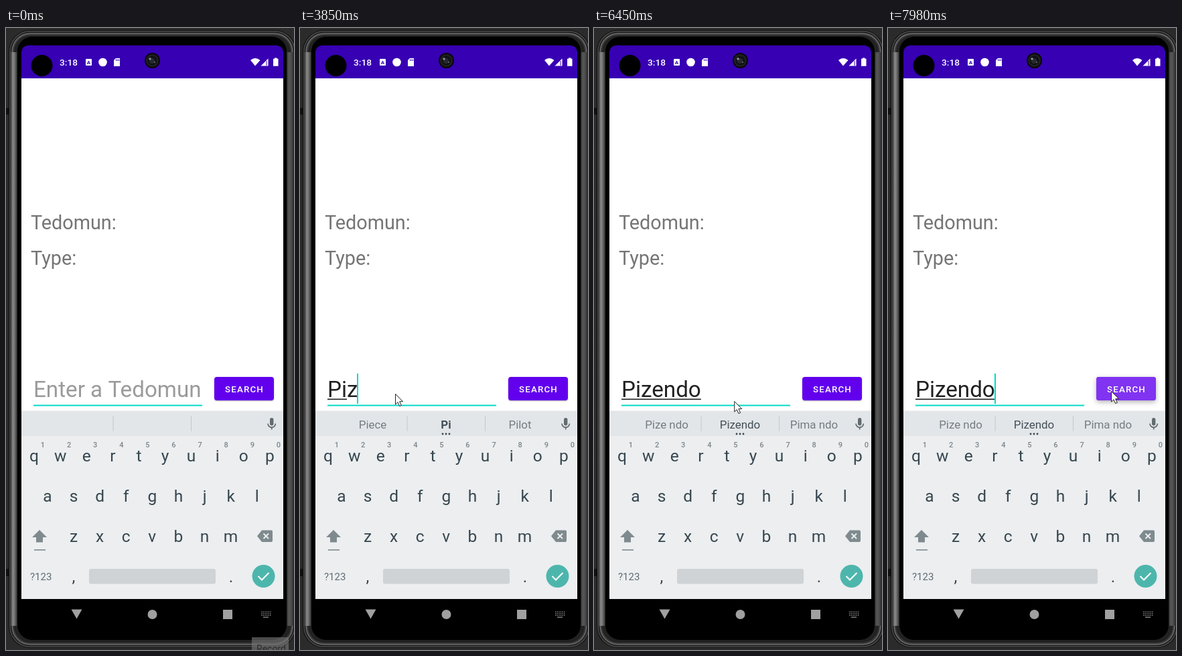
Recreate the animation shown at these times as an HTML page with a canvas. Size 430 by 927 pixels, loop 8000 ms.

```html
<!DOCTYPE html>
<html lang="en">
<head>
<meta charset="utf-8">
<title>Search screen</title>
<style>
html, body { margin: 0; width: 100%; height: 100%; overflow: hidden; background: #2b2b2b; }
canvas { display: block; width: 430px; height: 927px; }
</style>
</head>
<body>
<canvas id="stage"></canvas>
<script>
const W = 430, H = 927, LOOP = 8000;
const canvas = document.getElementById('stage');
const ctx = canvas.getContext('2d');
const dpr = window.devicePixelRatio || 1;
canvas.width = W * dpr;
canvas.height = H * dpr;

const TEAL = '#03dac5', PURPLE = '#6200ee', INK = '#37474f', KEYS = '#eceef0';
const KIND = 'Tedomun', WORD = 'Pizendo';
const FIELD_X = 41, FIELD_SIZE = 33.2;

// [time, letters typed, letters underlined]
const typing = [
  [0, 0, 0], [2080, 1, 0], [2280, 2, 0], [2400, 2, 2],
  [3850, 3, 2], [3920, 3, 3], [4450, 4, 3], [4510, 4, 4],
  [5250, 5, 4], [5350, 5, 5], [5450, 6, 6], [5550, 7, 6], [5650, 7, 7]
];
// [time, left, middle, right]
const hints = [
  [0], [2540, 'Piece', 'Pi', 'Pilot'],
  [4050, 'Pizza', 'Piz', 'Pie'],
  [4510, 'Pine', 'Pize', 'Pizza'],
  [5650, 'Pize ndo', WORD, 'Pima ndo']
];
const caretHidden = [[0, 650], [1150, 1220], [1820, 2080], [3000, 3850], [5050, 5250], [6180, 6680]];

const within = (t, a, b) => t >= a && t < b;
const latest = (list, t) => list.filter(e => e[0] <= t).pop();
const clamp = v => Math.max(0, Math.min(1, v));
const ease = p => p * p * (3 - 2 * p);
const stepped = (t, start, gap, count) => clamp((Math.floor((t - start) / gap) + 1) / count);

function rect(x, y, w, h, color) {
  ctx.fillStyle = color;
  ctx.fillRect(x, y, w, h);
}

function round(x, y, w, h, r, color) {
  ctx.beginPath();
  ctx.roundRect(x, y, w, h, r);
  ctx.fillStyle = color;
  ctx.fill();
}

function disc(x, y, r, color) {
  ctx.beginPath();
  ctx.arc(x, y, r, 0, Math.PI * 2);
  ctx.fillStyle = color;
  ctx.fill();
}

function shape(path, color, x = 0, y = 0) {
  ctx.save();
  ctx.translate(x, y);
  ctx.fillStyle = color;
  ctx.fill(new Path2D(path));
  ctx.restore();
}

function line(path, color, width) {
  ctx.strokeStyle = color;
  ctx.lineWidth = width;
  ctx.stroke(new Path2D(path));
}

function text(str, x, y, size, color, { weight = 400, align = 'left', spacing = 0 } = {}) {
  ctx.font = `${weight} ${size}px Roboto, sans-serif`;
  ctx.textAlign = align;
  ctx.letterSpacing = spacing + 'px';
  ctx.fillStyle = color;
  ctx.fillText(str, x, y);
}

function gradient(x0, x1, ...colors) {
  const g = ctx.createLinearGradient(x0, 0, x1, 0);
  colors.forEach((c, i) => g.addColorStop(i / (colors.length - 1), c));
  return g;
}

function drawPhone() {
  rect(0, 0, W, H, '#2b2b2b');
  rect(0, 119, 5, 10, '#101010');
  rect(0, 806, 5, 11, '#101010');
  const rim = [[0, '#0c0c0c'], [1, '#4a4a4a'], [2.5, '#222222'], [4.5, '#6c6c6c'], [6, '#3a3a3a'], [8, '#222222']];
  for (const [d, color] of rim) round(4 + d, 3 + d, 429 - 2 * d, 921 - 2 * d, 32 - d, color);

  // side light along the metal edges
  rect(7, 36, 13, 855, gradient(7, 20, '#3a3a3a', '#8c8c8c', '#686868', '#2c2c2c', '#080808'));
  rect(418, 36, 12, 855, gradient(418, 430, '#161616', '#585858', '#4c4c4c', '#262626'));

  round(17, 13, 402, 899, 22, '#000');
  round(23, 26, 391, 871, 10, '#000');
  round(23, 26, 391, 49, [10, 10, 0, 0], '#3700b3');
  rect(23, 75, 391, 496, '#fff');
}

function drawStatus() {
  disc(53.5, 56, 16, '#000');
  text('3:18', 80, 56, 13.7, '#fff', { weight: 500 });
  round(119, 46, 9, 10, 1, '#fff');
  text('A', 123.5, 54, 8, '#3700b3', { weight: 700, align: 'center' });
  disc(144.5, 51, 6.3, '#fff');
  shape('M164 45h6v12h-9v-9z', '#fff');
  for (let i = 0; i < 3; i++) rect(164 + i * 2, 46.5, 1, 2.5, '#3700b3');

  disc(218.5, 48.5, 11.5, '#08080a');
  disc(218.5, 48.5, 9.5, '#202022');
  disc(218.5, 48.5, 7, '#111114');
  disc(218, 49, 4, '#252a30');
  disc(215, 46, 1.8, '#8d9095');
  disc(222, 51, 1, '#70757a');

  shape('M365 48Q372 42 379.5 48L372 56.5Z', '#fff');
  shape('M391.5 45.5V56.5H380.5Z', '#fff');
  rect(388.5, 49, 1, 7, '#3700b3');
  shape('M401 44.5h3.5v1.3h2v11h-7.500v-11h2z', '#fff');
}

function drawKeyboard() {
  rect(23, 570.5, 391, 38, '#e3e6e9');
  rect(23, 608, 391, 243, KEYS);
  rect(159.5, 578, 1, 23, '#c3c8cb');
  rect(276, 578, 1, 23, '#c3c8cb');

  round(394, 581, 5.4, 11.5, 2.7, '#616b70');
  line('M391 589.500a5.700 5.700 0 0 0 11.400 0M396.700 595v3.500', '#616b70', 1.7);

  const rows = [['qwertyuiop', 42, 646], ['asdfghjkl', 62, 706], ['zxcvbnm', 101, 766]];
  for (const [keys, x, y] of rows)
    [...keys].forEach((k, i) => text(k, x + i * 39.1, y, 24.5, INK, { align: 'center' }));
  for (let i = 0; i < 10; i++)
    text(String((i + 1) % 10), 55 + i * 39.1, 625, 11, '#7b868b', { weight: 500, align: 'center' });

  shape('M50 748l11 11h-6v7.500h-10v-7.500h-6z', '#7f8a8f');
  rect(42, 777, 17, 1.6, '#7f8a8f');
  shape('M382 748.500h14q2 0 2 2v13.500q0 2-2 2h-14l-7-8.700z', '#7f8a8f');
  line('M384.500 753.500l7.500 7.500m0-7.500l-7.500 7.500', KEYS, 1.9);

  text('?123', 36, 822.5, 15, '#5f6c73');
  text(',', 101, 826, 24.5, INK, { align: 'center' });
  round(124, 806, 189, 22.5, 3, '#d0d3d6');
  text('.', 336, 826, 24.5, INK, { align: 'center' });
  disc(384.5, 817, 17, '#4db6ac');
  line('M376.500 817l5.500 5.500l10.500-10.500', '#fff', 2);
}

function drawNav() {
  const gray = '#a0a0a0';
  shape('M97.500 866.500h16l-8 14z', gray);
  disc(218.5, 874, 7, gray);
  rect(324, 867, 14, 14, gray);
  for (let r = 0; r < 3; r++)
    for (let c = 0; c < 6; c++) rect(381 + c * 2.6, 869.5 + r * 2.6, 1.4, 1.3, '#909090');
  rect(384, 877.5, 8, 1.3, '#909090');
}

function drawField(t) {
  const [, count, under] = latest(typing, t);
  const typed = WORD.slice(0, count);
  rect(FIELD_X, 561.5, 252, 2, TEAL);
  text(typed || 'Enter a ' + KIND, FIELD_X, 550, FIELD_SIZE, typed ? '#212121' : '#9b9b9b');
  const end = FIELD_X + ctx.measureText(typed).width;
  if (under) rect(FIELD_X, 552.5, ctx.measureText(WORD.slice(0, under)).width, 1.6, '#212121');
  if (!caretHidden.some(([a, b]) => within(t, a, b)))
    rect(Math.max(FIELD_X, Math.round(end) - 1), 515, 2, 45, TEAL);
}

function drawHints(t) {
  const [, left, mid, right] = latest(hints, t);
  if (!mid) return;
  const gray = '#737d82';
  text(left, 108.5, 597, 16.9, gray, { align: 'center' });
  text(mid, 218, 597, 16.9, '#435057', { align: 'center', weight: mid === WORD ? 400 : 700 });
  text(right, 328.5, 597, 16.9, gray, { align: 'center' });
  for (let i = -1; i < 2; i++) disc(218 + i * 5, 605, 1.4, INK);
}

function drawButton(t) {
  const press = t < 6990 ? 0 : stepped(t, 6990, 68, 6);
  ctx.save();
  ctx.shadowColor = 'rgba(0,0,0,.3)';
  ctx.shadowBlur = (2 + press * 5) * dpr;
  ctx.shadowOffsetY = (1 + press * 1.5) * dpr;
  round(311, 520, 89, 35, 4, PURPLE);
  ctx.restore();
  if (press) {
    ctx.save();
    ctx.beginPath();
    ctx.roundRect(311, 520, 89, 35, 4);
    ctx.clip();
    disc(331 + press * 24, 538, 12 + press * 48, '#8033f1');
    ctx.restore();
  }
  text('SEARCH', 327, 543, 13.3, '#fff', { weight: 500, spacing: 1.19 });
}

function drawPointer(t) {
  if (t < 70) return;
  const a = ease(stepped(t, 70, 73, 10));
  const p = t < 6180 ? 0 : stepped(t, 6180, 74, 10);
  const b = ease(p);
  const x = 392 - 250 * a + 191 * b;
  const y = 925 - 380 * a - 4 * b + 13 * Math.sin(Math.PI * p);
  const glow = 'rgba(201,180,28,.6)';
  if (within(t, 870, 940)) disc(141.5, 542, 14, glow);
  if (within(t, 6920, 6990)) disc(331.5, 539, 14, glow);
  const arrow = 'M.5 .5V16L4 12.700L6.700 18.600L9.300 17.400L6.700 11.700H11.500Z';
  shape(arrow, '#fff', x, y);
  ctx.save();
  ctx.translate(x, y);
  line(arrow, '#222', 1);
  ctx.restore();
}

function drawTip(t) {
  if (t >= 140) return;
  rect(367, 908, 55, 19, 'rgba(120,120,120,.62)');
  text('Record', 374, 930, 14, '#2c2c2c');
}

function draw(t) {
  ctx.setTransform(dpr, 0, 0, dpr, 0, 0);
  drawPhone();
  drawStatus();
  text(KIND + ':', 37, 300, 28.8, '#757575');
  text('Type:', 37, 353, 28.8, '#757575');
  drawField(t);
  drawButton(t);
  drawKeyboard();
  drawHints(t);
  drawNav();
  drawTip(t);
  drawPointer(t);
}

let start;
function tick(now) {
  start ??= now;
  draw((now - start) % LOOP);
  requestAnimationFrame(tick);
}
draw(0);
requestAnimationFrame(tick);
</script>
</body>
</html>
```
